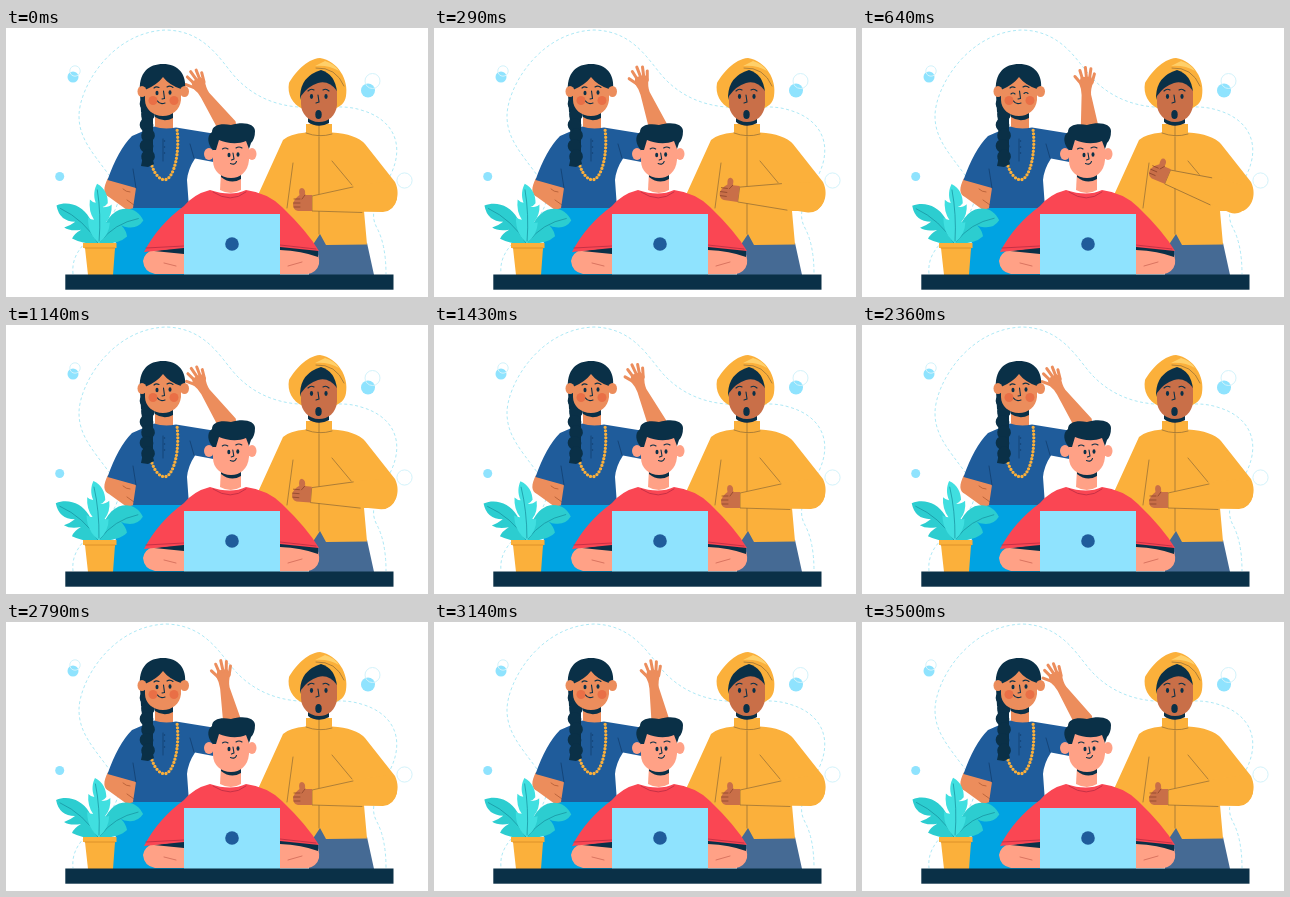
Animation of 422 by 269 pixels, one loop 3.57 s. Source, as an HTML page:

```html
<!DOCTYPE html>
<html lang="en">
<head>
<meta charset="utf-8">
<title>Three friends at a desk</title>
<style>
html, body { margin: 0; width: 100%; height: 100%; overflow: hidden; background: #fff; }
svg { display: block; width: 100%; height: 100%; }
.line { fill: none; stroke-linecap: round; stroke-linejoin: round; }
.dark { fill: #0a3047; }
.ink { stroke: #0a3047; stroke-width: 1.1; }
.navy { fill: #1f5c9b; }
.gold { fill: #fbb03b; }
.seam { stroke: #8f6a35; stroke-width: .7; }
.tan { fill: #ec8d5c; }
.brown { fill: #c96f48; }
.pink { fill: #ffa186; }
.red { fill: #fa4653; }
.sky { fill: #8fe3fe; }
.ring { fill: none; stroke: #d3f3fb; stroke-width: 1; }
.vein { stroke: #168e9c; stroke-width: .7; }
</style>
</head>
<body>
<svg viewBox="0 0 422 269">
  <!-- backdrop -->
  <path id="trail" class="line" stroke="#a4e6f4" stroke-width=".9" stroke-dasharray="3 2.5" style="stroke-linecap:butt"
    d="M67 246C65 226 78 215 95 200C115 180 118 165 103 147C86 124 73 110 73 88C73 60 105 4 160 2C202 3 216 36 232 52C248 68 268 77 292 79C320 81 336 76 355 82C387 91 399 116 385 146C372 170 362 184 371 200Q380 217 380 246"/>
  <circle class="sky" cx="67" cy="49" r="5.5"/><circle class="ring" cx="69" cy="43" r="5.2"/>
  <circle class="sky" cx="362" cy="62.5" r="7"/><circle class="ring" cx="366.500" cy="53" r="7.5"/>
  <circle class="sky" cx="53.7" cy="148.500" r="4.500"/><circle class="ring" cx="398.500" cy="152.500" r="7.600"/>

  <!-- woman -->
  <g>
    <g id="wave">
      <path class="tan" d="M220 67Q220 61 217.500 55L219.500 49H229.500L232 54Q229 61 229.500 67L238 105L232 122L212 120L219 98Z"/>
      <path class="line" stroke="#ec8d5c" stroke-width="3" d="M219 55L213.500 48.500M221 51L218.500 42.500M225 50L224 39.500M228 51L229.500 41M230.500 55L233 46"/>
    </g>
    <path fill="#00a3e2" d="M125 179H184L192 247H105Q108 208 121 180Z"/>
    <path class="tan" d="M102 150C97 160 97 166 103 169L121 182L131 179L130 158Z"/>
    <path class="line" stroke="#a8532f" stroke-width=".7" d="M117 161Q120 164 124 164M121 172L128 177"/>
    <path class="tan" d="M149 82H167V102H149Z"/>
    <path class="dark" d="M149 83L167 84V90Q158 95 149 89Z"/>
    <path class="navy" d="M148 98.500Q158 102 170 99.500L207 105.500Q210 120 207.500 134L189 130.500Q182 141 181 152L183 180H127L130 160L101.500 152Q112 122 126 108Z"/>
    <path class="line" stroke="#123f70" stroke-width=".8" d="M130 160L127 141M188 130L184 116M157 111V133"/>
    <path class="line" stroke="#123f70" stroke-width="1.500" stroke-dasharray="0 6" d="M158.500 113V131"/>
    <path class="line" stroke="#fbb03b" stroke-width="3.300" stroke-dasharray="0 3.500" d="M146 138C149 147 155 153 160 151.500C168 149 174 125 171 101"/>
    <path class="dark" d="M134 66C132 44 143 36 157 36C172 36 181 46 179 62L160 70L148 74L146 86L135 84Z"/>
    <g class="dark" id="braid"></g>
    <ellipse class="tan" cx="136" cy="63.500" rx="4.500" ry="5.500"/>
    <ellipse class="tan" cx="178.500" cy="63.500" rx="4.500" ry="5.500"/>
    <path class="tan" d="M139 62Q151 57 157 49Q163 57 175 61V72C174 82 166 88 157 88C147 88 139 81 139 72Z"/>
    <g fill="#e8663f" opacity=".75"><circle cx="147" cy="72.500" r="4.500"/><circle cx="168" cy="72.500" r="4.500"/></g>
    <g id="open" class="dark"><ellipse cx="151" cy="65" rx="1.500" ry="2.200"/><ellipse cx="164" cy="64.500" rx="1.500" ry="2.200"/></g>
    <path id="shut" class="line ink" d="M149 66Q151 64 153 66M162 65.500Q164 63.500 166 65.500"/>
    <path class="line ink" d="M148 60Q150 58 153 59.500M161 59Q164 57 167 59.500M157.500 63L158.500 70.500L156 71M151.500 73Q154 77 159 75"/>
  </g>

  <!-- man in turban -->
  <g>
    <path fill="#456a94" d="M313 204L303 219V247H368L361 215Z"/>
    <path class="gold" d="M300 104.500Q283 106 277 112L252 167L274 205L306 218L314 206L320 217L361 216.500L358 183H381C392 178 394 164 389 154L359 116Q350 106 326 104.500Z"/>
    <path class="line seam" d="M313 107V206M287 135L281 180M326 133L346 157"/>
    <g id="thumb">
      <path class="gold" d="M306 168L347 158L380 153Q391 160 391 171Q388 183 377 184L306 183Z"/>
      <path class="line seam" d="M347 159L306 168V183L356 184.500"/>
      <path class="brown" d="M306 167L299 167Q300 161 296 160Q292 160 293.500 167Q288 171 287 176Q287 182 292 183H306Z"/>
      <path class="line" stroke="#854027" stroke-width=".7" d="M288 171H294M287.500 175H294M288 179H294M299 167L296 171"/>
    </g>
    <path class="gold" d="M300 96H326V108Q313 111 300 106Z"/>
    <path class="line seam" d="M300 105Q313 110 326 106M313 97V108"/>
    <path class="brown" d="M303 86H323V95Q313 100 303 95Z"/>
    <path class="dark" d="M302 88L323 89V95Q312 101 302 94Z"/>
    <path class="gold" d="M297 81C286 76 281 66 283 55C288 46 300 31 314 30C332 33 343 52 340 68C339 75 334 79 328 81Z"/>
    <path class="line seam" d="M310 40Q330 39 338 58"/>
    <path fill="#ffd06a" d="M309 38L319 33Q329 36 333 43Q323 37 309 38Z"/>
    <path class="dark" d="M294 68Q295 48 315 42Q329 46 331 64L329 72H295Z"/>
    <path class="brown" d="M295 68Q302 58 312 55Q323 52 331 63V77C330 88 322 94 313 94C303 94 295 86 295 76Z"/>
    <g class="dark"><ellipse cx="305.500" cy="68.500" rx="1.600" ry="2.400"/><ellipse cx="320" cy="68.500" rx="1.600" ry="2.400"/><ellipse cx="312.500" cy="86.500" rx="3.200" ry="4.500"/></g>
    <path class="line ink" d="M302 63Q305 60 308 62M317 62Q320 60 323 63M312 67L313 74L310 75"/>
  </g>

  <!-- boy with laptop -->
  <g>
    <path class="pink" d="M148 221H188V246H149Q138 244 137 233Q138 225 148 221ZM262 218H308Q314 227 313 236Q311 244 302 246H262Z"/>
    <path class="dark" d="M148 223L178 219V226ZM274 218L312 222V229Q296 223 274 222Z"/>
    <path class="line" stroke="#c9604f" stroke-width=".7" d="M158 235L170 238M282 238L296 234"/>
    <path class="red" d="M204 162Q225 169 240 162Q262 165 276 179Q301 203 313 223L274 219V240H178V220L138 224Q152 197 178 178Q188 166 204 162Z"/>
    <path class="line" stroke="#b92d43" stroke-width=".8" d="M140 220L178 218M274 217L310 221M207 164Q225 176 240 164"/>
    <path class="pink" d="M215 144H235V162Q225 168 214 162Z"/>
    <path class="dark" d="M215 146H235V151Q225 157 215 149Z"/>
    <g>
      <ellipse class="pink" cx="203" cy="126" rx="5" ry="6"/><ellipse class="pink" cx="246" cy="126" rx="4.500" ry="6"/>
      <path class="pink" d="M207 110H243V132C242 144 234 150 225 150C215 150 207 143 207 133Z"/>
      <path class="dark" d="M207 122C202 117 200 108 206 104C206 97 215 95 225 97C238 93 249 96 249 103Q249 111 245 115L243 121L240 113C231 117 220 115 213 112L210 122Z"/>
      <g id="face">
        <g class="dark"><ellipse cx="223" cy="127" rx="1.500" ry="2.300"/><ellipse cx="232" cy="126.500" rx="1.500" ry="2.300"/></g>
        <path class="line ink" d="M216.500 121Q219 119 222 121M230 120Q233 118 236 120M227 125L228 131L225.500 132M224.500 135.500Q229 137.500 230.500 133.500"/>
      </g>
    </g>
    <path class="sky" d="M178 186H274V247H178Z"/>
    <circle class="navy" cx="226" cy="216" r="6.800"/>
  </g>

  <!-- plant -->
  <g id="left">
    <path fill="#2ccdd0" d="M50 178C62 173 76 178 83 190Q90 202 93 216Q78 217 66 211Q68 206 75 202Q64 204 58 200Q64 198 69 194Q53 194 50 178Z"/>
    <path class="line vein" d="M54 181Q78 192 92 215"/>
  </g>
  <g id="right">
    <path fill="#2ccdd0" d="M93 216C95 200 102 186 113 181.500C124 178 133 183 137 192Q132 200 122 199Q118 199 115 197Q120 202 121 208Q113 216 93 216Z"/>
    <path class="line vein" d="M94 214Q108 195 132 190"/>
  </g>
  <g id="middle">
    <path fill="#40dfe0" d="M93 215C86 210 81 202 81 190Q84 192 87 192Q81 184 82 172Q85 175 88 175C85 168 86 161 88.500 156C97 160 100 168 100 175Q98 178 95 179Q101 179 104 176Q105 187 99 194Q101 195 103 194Q103 206 93 215Z"/>
    <path class="line vein" d="M89 162Q94 186 93 213"/>
  </g>
  <path class="gold" d="M77 215H110.500V220H109L107 247H82L79 220H77Z"/>
  <path class="line" stroke="#d58a25" stroke-width=".8" d="M79 220H109"/>
  <rect class="dark" x="59.300" y="246.500" width="328.200" height="15.200"/>
</svg>
<script>
const LOOP = 3570, STEP = 71.4, TAU = 2 * Math.PI;
const el = id => document.getElementById(id);
const turn = (id, angle, x, y) => el(id).setAttribute("transform", `rotate(${angle} ${x} ${y})`);
const ease = x => { x = Math.min(1, Math.max(0, x)); return x * x * (3 - 2 * x); };

let braid = '<path d="M135 76L147 80L147 136L138 136Z"/>';
for (let i = 0; i < 6; i++) {
  const y = 76 + i * 10.5, x = 141 + (i % 2 ? 1 : -.5);
  braid += `<ellipse cx="${x}" cy="${y}" rx="6.8" ry="7" transform="rotate(${i % 2 ? 25 : -25} ${x} ${y})"/>`;
}
el("braid").innerHTML = braid + '<path d="M137 128H146L148 136L142 139L135 138Z"/>';

function draw(now) {
  const t = Math.floor((now % LOOP + 4) / STEP) * STEP;
  const sway = Math.cos(TAU * t / LOOP);
  const raise = ease((t - 100) / 480) * (1 - ease((t - 800) / 480));
  const blink = t > 560 && t < 780;

  turn("wave", -15 - 15 * Math.cos(3 * TAU * t / LOOP), 212, 115);
  el("thumb").setAttribute("transform", `translate(${-4 * raise} 0) rotate(${23 * raise} 373 171)`);
  turn("middle", 2.5 * sway, 93, 215);
  turn("left", .8 * sway, 93, 215);
  turn("right", .8 * sway, 93, 215);
  el("face").setAttribute("transform", `translate(${-raise} 0)`);
  el("open").setAttribute("opacity", blink ? 0 : 1);
  el("shut").setAttribute("opacity", blink ? 1 : 0);
  el("trail").setAttribute("stroke-dashoffset", -5.5 * 6 * t / LOOP);
}

const start = performance.now();
function tick() {
  draw(performance.now() - start);
  requestAnimationFrame(tick);
}
tick();
</script>
</body>
</html>
```
